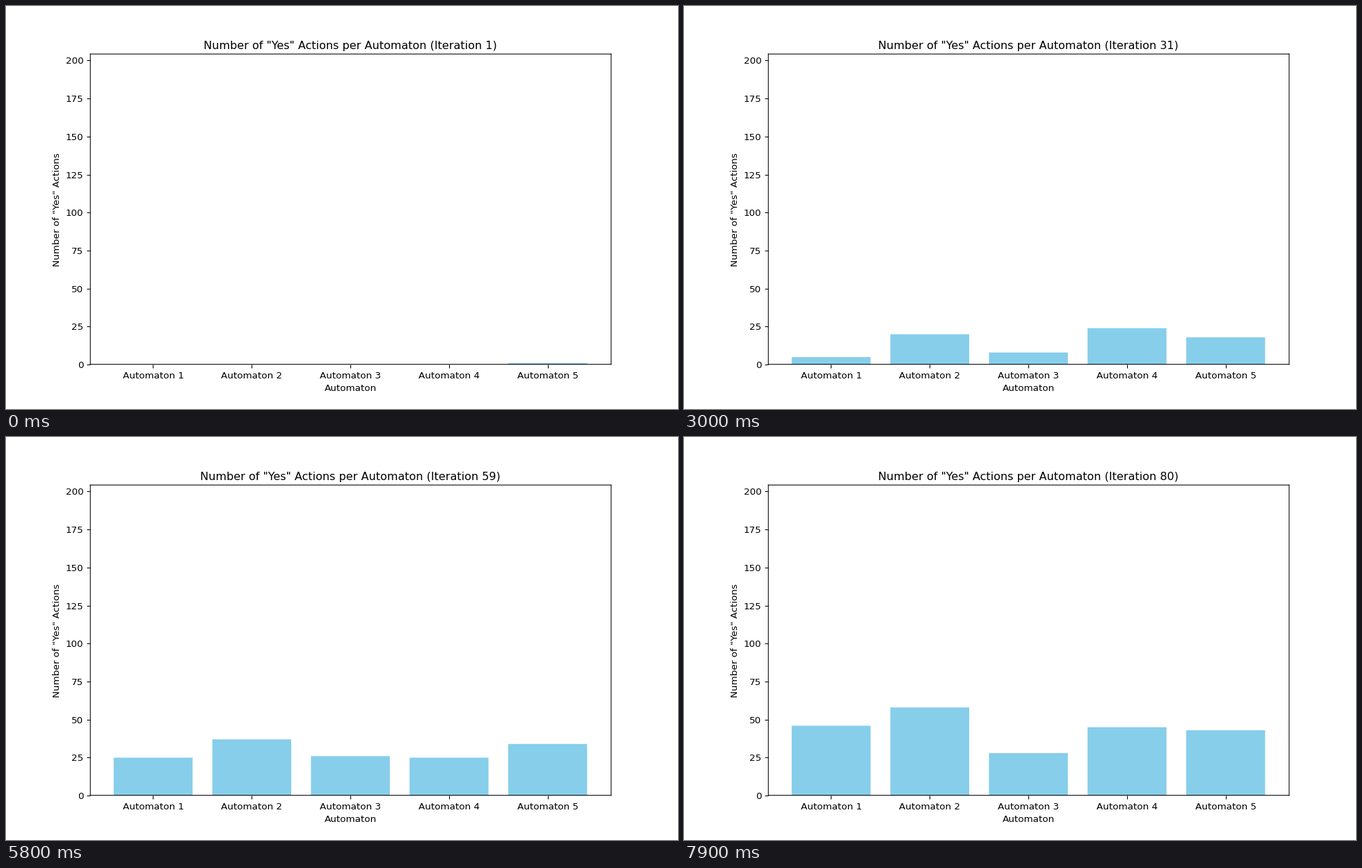
A matplotlib script that plays this animation: 966 px wide and 580 px high, repeating every 8 s.

```python
import numpy as np
import matplotlib.pyplot as plt
from matplotlib.animation import FuncAnimation
from matplotlib.patheffects import Stroke

WIDTH, HEIGHT, DPI = 966, 580, 96.6
STEPS, INTERVAL = 80, 100

# Each automaton starts at "No" and flips its answer at these iterations.
FLIPS = [
    (8, 13, 36, 46, 50),
    (7, 27, 35, 45, 53),
    (5, 13, 37, 55, 62, 63, 77, 78),
    (4, 28, 52, 53, 61),
    (1, 2, 13, 30, 36, 46, 54, 62, 71, 78),
]


def yes_count(flips, step):
    """Every flip bends the running total: up, flat, up, flat, ..."""
    return sum((-1) ** k * max(0, step + 1 - flip)
               for k, flip in enumerate(flips))


plt.rcParams.update({
    "font.family": "DejaVu Sans",
    "font.size": 10.08,
    "axes.titlesize": 11.96,
})
fig, ax = plt.subplots(
    figsize=((WIDTH + 1e-6) / DPI, (HEIGHT + 1e-6) / DPI), dpi=DPI)

x = np.arange(len(FLIPS))
bars = ax.bar(x, np.zeros(len(x)), color="skyblue")

# Draw edges at their true subpixel positions.
for bar in bars:
    bar.set_snap(False)
for spine in ax.spines.values():
    spine.set_snap(False)
    spine.set_path_effects([Stroke(offset=(0.36, 0.36))])

ax.set_xticks(x, [f"Automaton {i + 1}" for i in x])
ax.set_xlim(-0.64, 4.64)
ax.set_ylim(0, 204)
ax.set_xlabel("Automaton")
ax.set_ylabel('Number of "Yes" Actions')
title = ax.set_title("")


def update(frame):
    step = frame + 1
    for bar, flips in zip(bars, FLIPS):
        bar.set_height(yes_count(flips, step))
    title.set_text(f'Number of "Yes" Actions per Automaton (Iteration {step})')
    return [*bars, title]


anim = FuncAnimation(fig, update, frames=STEPS, interval=INTERVAL,
                     repeat=True, repeat_delay=0, blit=False)
plt.show()
```
